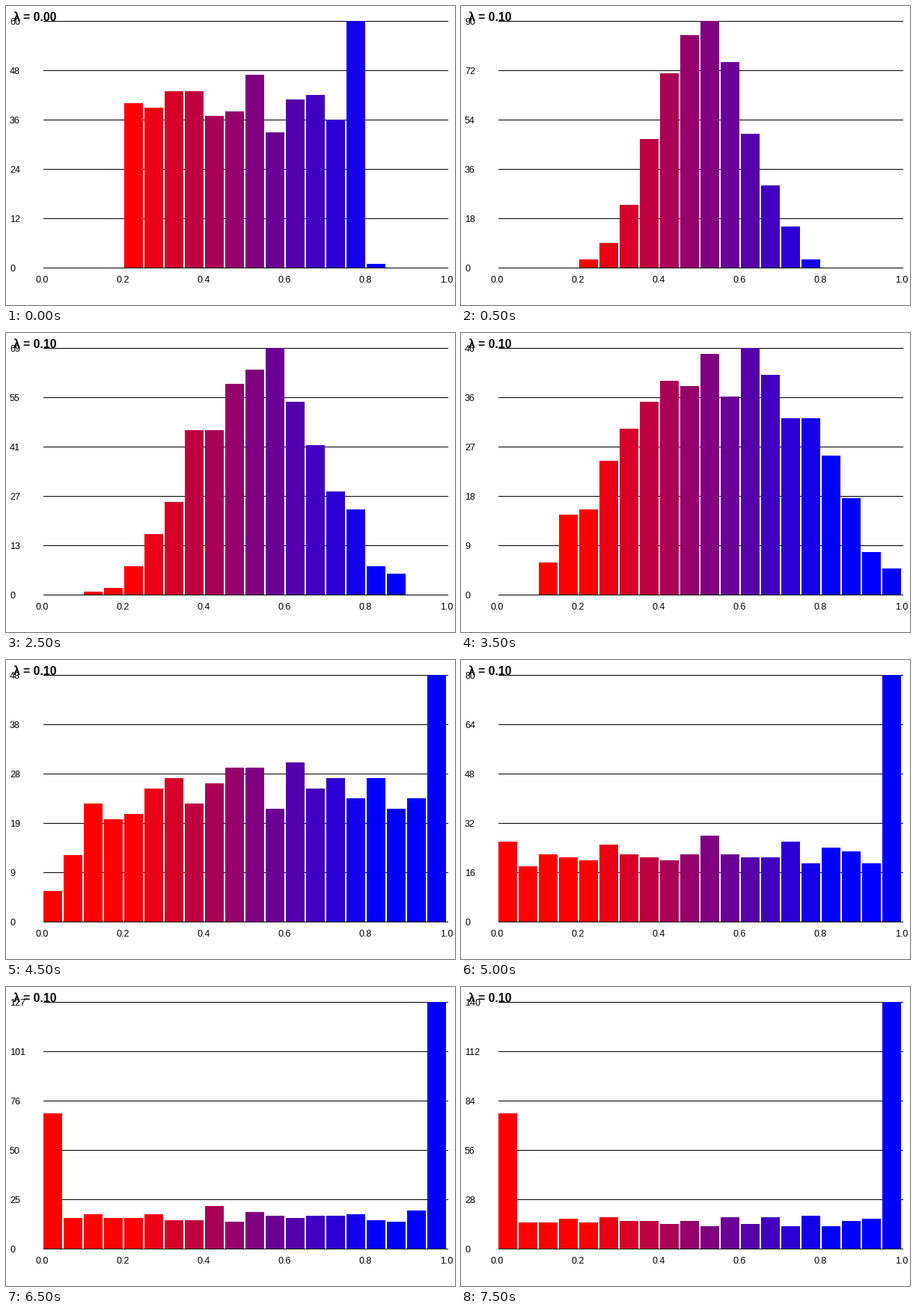
Recreate the animation shown at these times as a matplotlib script. Size 600 by 400 pixels, loop 8000 ms.

```python
import numpy as np
import matplotlib.pyplot as plt
from matplotlib.animation import FuncAnimation
from matplotlib.patches import Rectangle

W, H, DPI = 600, 400, 100
LEFT, BASE, HEIGHT = 50, 350, 330
BINS, STEP, BAR = 20, 27, 25
FRAMES, INTERVAL = 16, 500
AGENTS = 500


def initial_opinions(noise):
    """Even spread over 0.2..0.8, with the overshoot piled at the top."""
    x = np.clip(np.linspace(0.2, 0.82, AGENTS) + noise, 0.2, 0.799)
    x[-1] = 0.81
    return x


def drifted_opinions(step, noise):
    """A bell that widens, flattens and piles up at both extremes."""
    u = (np.arange(AGENTS) + 0.5) / AGENTS
    # Tukey lambda quantiles: near 0.14 a normal curve, at 1 a uniform one
    shape = 0.2 + 0.8 * np.clip((step - 3) / 8, 0, 1) ** 2
    q = u ** shape - (1 - u) ** shape
    mean = 0.5 + 0.0067 * step
    std = 0.29 + 0.194 * np.tanh(0.235 * (step - 9.2))
    return mean + std * q / q.std() + noise


def counts_at(step):
    noise = np.random.default_rng(step).normal(0, 0.012, AGENTS)
    x = drifted_opinions(step, noise) if step else initial_opinions(noise)
    bins = np.clip(np.floor(x * BINS), 0, BINS - 1).astype(int)
    return np.bincount(bins, minlength=BINS)


def bar_color(i):
    t = min(max((i / BINS - 0.2) / 0.6, 0), 1)
    return 1 - t, 0, t


plt.rcParams["font.family"] = "Liberation Sans"
fig = plt.figure(figsize=(W / DPI, H / DPI), dpi=DPI, facecolor="white")
ax = fig.add_axes([0, 0, 1, 1])
ax.set_xlim(0, W)
ax.set_ylim(H, 0)
ax.axis("off")


def box(x, y, w, h, color, z):
    return ax.add_patch(Rectangle((x, y), w, h, facecolor=color, linewidth=0,
                                  antialiased=False, zorder=z))


def label(x, y, text="", px=12.5, **style):
    return ax.text(x, y, text, fontsize=px * 72 / DPI, color="black",
                   ha="left", va="baseline", zorder=4, **style)


y_labels = []
for k in range(6):
    y = BASE - k * HEIGHT // 5
    box(LEFT, y, 541, 1, "black", 1)
    y_labels.append(label(5, y + 5))
    label(LEFT - 10 + 108 * k, 370, f"{k / 5:.1f}")

bars = [box(LEFT + STEP * i, BASE, BAR, 0, bar_color(i), 2)
        for i in range(BINS)]
title = label(10, 20, px=15.7, weight="bold")


def draw(step):
    counts = counts_at(step)
    top = int(counts.max())
    for bar, n in zip(bars, counts):
        h = int(n) * HEIGHT // top
        bar.set_y(BASE - h)
        bar.set_height(h)
    for k, text in enumerate(y_labels):
        text.set_text(str(top * k // 5))
    title.set_text(f"λ = {0.1 if step else 0:.2f}")
    return [*bars, *y_labels, title]


anim = FuncAnimation(fig, draw, frames=FRAMES, interval=INTERVAL,
                     repeat=True, repeat_delay=0, blit=False)
plt.show()
```
